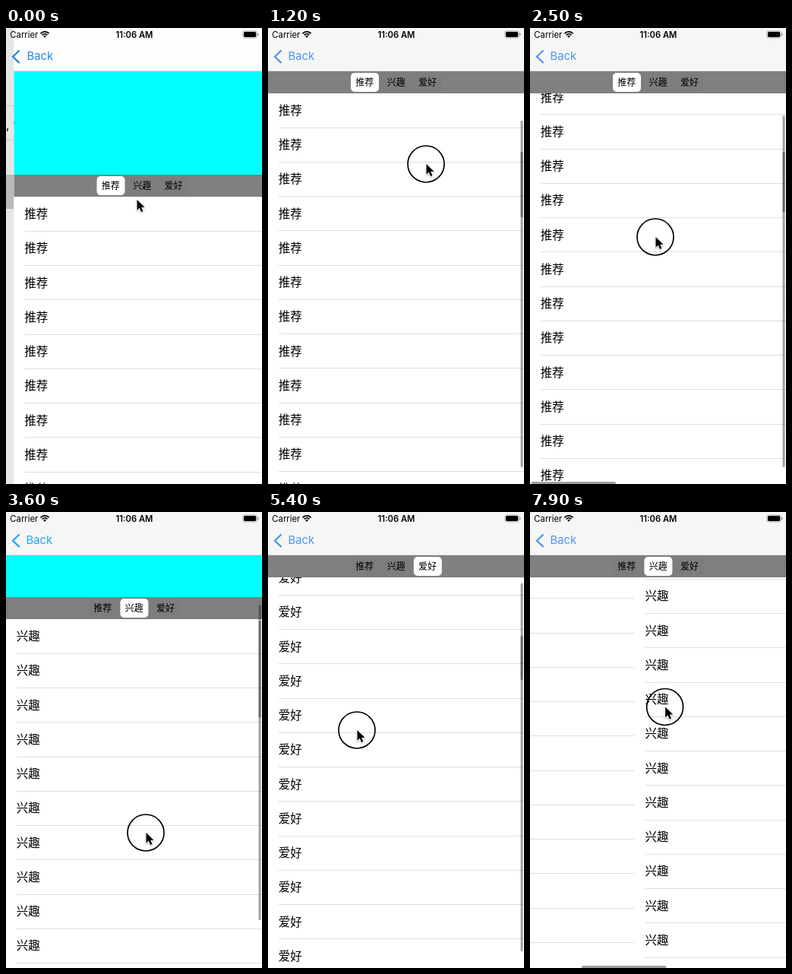
An HTML page with a canvas for the animation above (8 s loop, 337 px wide and 600 px high).

```html
<!DOCTYPE html>
<html lang="zh">
<head>
<meta charset="utf-8">
<style>
html, body { margin: 0; width: 100%; height: 100%; overflow: hidden; background: #fff; }
canvas { display: block; width: 337px; height: 600px; }
</style>
</head>
<body>
<canvas></canvas>
<script>
const W = 337, H = 600, NAV = 57, HEAD = 136, BAR = 29, ROW = 45.25, TAB = 41.4;
const LOOP = 8000, STEP = 100, SNAP = 456, HOLD = 200, FADE = 240, PRESS = 50;
const TABS = ['推荐', '兴趣', '爱好'];
const CJK = '"Noto Sans CJK SC", "Noto Sans CJK", sans-serif';
const LATIN = 'Inter, "Liberation Sans", sans-serif';

// The pointer's drags; scrolling and paging follow from them
const drag = (start, time, x, y, dx, dy) =>
  ({ start, end: start + time, x, y, dx, dy, sideways: Math.abs(dx) > Math.abs(dy) });
const drags = [
  drag(600, 600, 205, 451, 3, -272),
  drag(1700, 700, 190, 247, -25, 28),
  drag(2500, 250, 165, 275, -120, 0),
  drag(3300, 600, 180, 367, 8, 110),
  drag(4100, 400, 188, 477, -8, -153),
  drag(4700, 250, 230, 300, -120, 0),
  drag(5100, 600, 117, 309, 0, -44),
  drag(6406, 190, 122, 237, 128, 0),
  drag(7700, SNAP, 40, 256.5, W, 0)
];

const canvas = document.querySelector('canvas'), c = canvas.getContext('2d');
const dpr = window.devicePixelRatio || 1;
canvas.width = W * dpr;
canvas.height = H * dpr;

const clamp = u => Math.max(0, Math.min(1, u));

function ease(t, from, to) {
  const u = clamp((t - from) / (to - from));
  return u * u * (3 - 2 * u);
}

function stateAt(t) {
  const s = { push: 10.5 * (1 - ease(t, 0, 300)), head: 0, paging: 0, offsets: [0, 0, 0],
    x: 172, y: 226, down: false, vBar: 0, hBar: 0 };
  let page = 0, free = 0;
  for (const d of drags) {
    const glide = ease(t, free, d.start - PRESS);
    s.x += (d.x - s.x) * glide;
    s.y += (d.y - s.y) * glide;
    if (t < d.start - PRESS) break;
    const u = ease(t, d.start, d.end);
    s.x += d.dx * u;
    s.y += d.dy * u;
    s.down = t <= d.end;
    free = d.end;
    if (t < d.start) break;
    if (d.sideways) {
      const turn = -Math.sign(d.dx);
      s.paging += turn * W * ease(t, d.start, d.start + SNAP);
      page += turn;
      s.hBar = clamp(1 - (t - d.start - SNAP) / FADE);
    } else {
      const travel = s.head + s.offsets[page] - d.dy * u;
      s.head = Math.min(HEAD, travel);
      s.offsets[page] = Math.max(0, travel - HEAD);
      s.vBar = clamp(1 - (t - d.end - HOLD) / FADE);
    }
  }
  return s;
}

function rect(x, y, w, h, fill) {
  c.fillStyle = fill;
  c.fillRect(x, y, w, h);
}

function pill(x, y, w, h, r, fill) {
  c.fillStyle = fill;
  c.beginPath();
  c.roundRect(x, y, w, h, r);
  c.fill();
}

function text(s, x, y, font, fill = '#000', align = 'left') {
  c.font = font;
  c.fillStyle = fill;
  c.textAlign = align;
  c.textBaseline = 'middle';
  c.fillText(s, x, y);
}

function drawPrevious(x) {
  rect(0, 0, x, H, '#e6e6e6');
  rect(0, 193, x, 45, '#b9b9bd');
  for (const y of [102, 147]) rect(0, y, x, 1, '#c8c8ca');
  text(', ‘', 0, 128, '15px ' + LATIN);
}

function drawPage(i, x, top, offset) {
  c.save();
  c.beginPath();
  c.rect(x, top, W, H - top);
  c.clip();
  for (let y = top - offset % ROW; y < H; y += ROW) {
    text(TABS[i], x + 13.8, y + 22.3, '15.5px ' + CJK);
    rect(x + 14, Math.round(y + ROW - 0.5), W, 1, '#dedee0');
  }
  c.restore();
}

function drawTabs(y, active) {
  rect(0, y, W, BAR, '#808080');
  pill(109, y + 2, 120, 25, 5, '#7d7d7d');
  pill(109 + active * TAB, y + 2, 37, 25, 5, '#fff');
  TABS.forEach((s, i) =>
    text(s, 127.3 + i * TAB, y + 14.7, (i === active ? 500 : 400) + ' 12px ' + CJK, '#000', 'center'));
}

function drawNav(head, x) {
  rect(x, 0, W, NAV, head ? '#f6f6f6' : '#fdfdfd');
  rect(x, NAV - 0.5, W, 0.5, '#c4c4c6');
  const tint = head === 0 ? '#2488dc' : head < HEAD ? '#22a5f3' : '#4f96ec';
  c.strokeStyle = tint;
  c.lineWidth = 2.2;
  c.lineCap = 'round';
  c.beginPath();
  c.moveTo(17, 30);
  c.lineTo(9, 37.7);
  c.lineTo(17, 45.4);
  c.stroke();
  text('Back', 26.5 + x / 10, 38, '14.8px ' + LATIN, tint);
}

function drawStatus() {
  text('Carrier', 5.3, 9.2, '11.3px ' + LATIN);
  text('11:06 AM', 169, 9.2, '600 11.2px ' + LATIN, '#000', 'center');
  const wave = r => c.arc(51, 12.5, r, -Math.PI * 0.76, -Math.PI * 0.24);
  c.strokeStyle = '#000';
  c.lineWidth = 1.7;
  c.lineCap = 'butt';
  for (const r of [4.6, 7.6]) {
    c.beginPath();
    wave(r);
    c.stroke();
  }
  c.beginPath();
  c.moveTo(51, 13);
  wave(2.6);
  c.fill();
  c.strokeStyle = '#999';
  c.lineWidth = 0.8;
  c.beginPath();
  c.roundRect(311.8, 3.9, 18.6, 9.2, 2.6);
  c.stroke();
  pill(313, 5.1, 16.2, 6.8, 1.6, '#000');
  pill(331.3, 6.8, 1.3, 3.4, 0.6, '#999');
}

function drawPointer(x, y, down) {
  if (down) {
    c.strokeStyle = '#000';
    c.lineWidth = 1.7;
    c.beginPath();
    c.arc(x, y, 24, 0, 7);
    c.stroke();
  }
  c.save();
  c.translate(x + 0.5, y);
  c.scale(0.92, 0.92);
  const arrow = new Path2D('M0 0V15L3.5 11.8 6 17.4 8.6 16.2 6.2 10.8 10.8 10.6Z');
  c.shadowColor = 'rgba(0,0,0,.3)';
  c.shadowBlur = 2 * dpr;
  c.shadowOffsetY = dpr;
  c.strokeStyle = '#fff';
  c.lineWidth = 1.8;
  c.lineJoin = 'round';
  c.stroke(arrow);
  c.shadowColor = 'transparent';
  c.fillStyle = '#000';
  c.fill(arrow);
  c.restore();
}

function drawBars(s, top, page) {
  const shade = alpha => `rgba(0,0,0,${0.38 * alpha})`;
  pill(332.6, 61.7 + 0.745 * s.head, 3, 415, 1.5, shade(s.vBar));
  pill(332.6, top + 2 + 0.249 * s.offsets[page], 3, 127.5, 1.5, shade(s.vBar));
  pill(1.5 + s.paging / 3, 597, 111.5, 3, 1.5, shade(s.hBar));
}

function draw(t) {
  const s = stateAt(t);
  const barY = Math.round(NAV + HEAD - s.head), top = barY + BAR;
  const page = Math.round(s.paging / W);

  c.setTransform(dpr, 0, 0, dpr, 0, 0);
  rect(0, 0, W, H, '#fff');
  drawPrevious(s.push);

  c.save();
  c.translate(s.push, 0);
  rect(0, NAV, W, H, '#fff');
  TABS.forEach((_, i) => {
    const left = i * W - s.paging;
    if (Math.abs(left) < W) drawPage(i, left, top, s.offsets[i]);
  });
  rect(0, NAV, W, barY - NAV, '#0ff');
  drawTabs(barY, page);
  drawBars(s, top, page);
  c.restore();

  drawNav(s.head, s.push);
  drawStatus();
  drawPointer(s.x, s.y, s.down);
}

const start = performance.now();
function tick() {
  const t = (performance.now() - start) % LOOP;
  draw(Math.floor(t / STEP) * STEP);
  requestAnimationFrame(tick);
}
tick();
</script>
</body>
</html>
```
